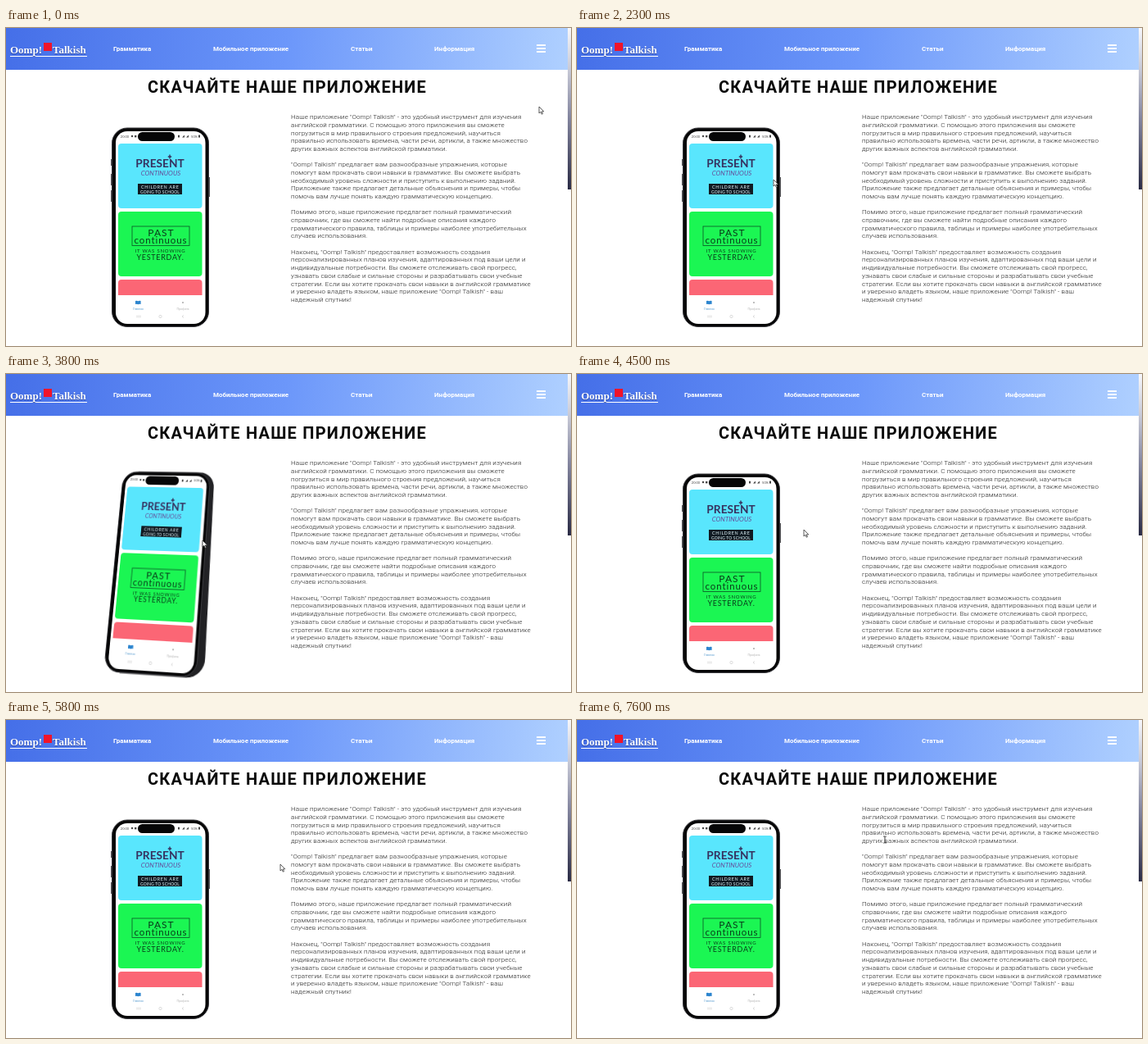
Animation of 690x388 px, one loop 7800 ms. Source, as an HTML page:

```html
<!DOCTYPE html>
<html lang="ru">
<head>
<meta charset="utf-8">
<title>Скачайте наше приложение</title>
<style>
html, body { margin: 0; width: 100%; height: 100%; overflow: hidden; background: #fff; }
#stage { position: relative; width: 690px; height: 388px; overflow: hidden; background: #fff; font-family: Roboto, sans-serif; }
#stage > * { position: absolute; }
header { left: 0; top: 0; width: 686px; height: 51px; background: linear-gradient(95deg, #456fe8, #6c97fa 50%, #afd0ff); }
header > * { position: absolute; }
nav a { position: absolute; top: 20px; font: 700 8px/11px Roboto, sans-serif; color: #fff; white-space: nowrap; }
.logo { left: 5px; top: 18px; width: 94px; height: 16px; border-bottom: 1px solid #fff; font: bold 13px/17px "Liberation Serif", serif; color: #fff; text-shadow: 0 1px 1px #2b4599; }
.logo > * { position: absolute; top: 0; }
.logo i { left: 41px; width: 10px; height: 10px; background: #f0142a; }
.logo b { left: 52px; }
.menu { left: 648px; top: 20px; width: 11px; height: 2px; background: #fff; box-shadow: 0 4px #fff, 0 8px #fff; }
.bar { left: 686px; top: 0; width: 4px; height: 197px; background: linear-gradient(#f6f7fb, #c9cbd8 25%, #8587a0 55%, #2a2b45); }
h1 { left: 0; top: 60px; width: 687px; margin: 0; text-align: center; font: 700 20px/25px Roboto, sans-serif; letter-spacing: 1.22px; color: #0a0a0a; white-space: nowrap; }
.text { left: 348px; top: 104.4px; margin: 0; font: 300 8px/9.67px Roboto, sans-serif; letter-spacing: .125px; color: #1c1c1c; white-space: pre; }
svg { left: 0; top: 0; overflow: visible; }
#phone { transform-origin: 188.5px 243px; }
#phone text { font-family: Lato, sans-serif; text-anchor: middle; }
#side { display: none; }
#phone.tilted { transform: translate(-2.5px, -4px) perspective(900px) rotateX(14deg) rotateY(-10deg) rotate(4.8deg) scale(.945, 1.045); }
.tilted #side { display: inline; }
.tilted #keys { display: none; }
</style>
</head>
<body>
<div id="stage">
  <header>
    <div class="logo"><span>Oomp!</span><i></i><b>Talkish</b></div>
    <nav>
      <a style="left:131px">Грамматика</a>
      <a style="left:253px">Мобильное приложение</a>
      <a style="left:421px">Статьи</a>
      <a style="left:523px">Информация</a>
    </nav>
    <div class="menu"></div>
  </header>
  <div class="bar"></div>
  <h1>СКАЧАЙТЕ НАШЕ ПРИЛОЖЕНИЕ</h1>
  <p class="text">Наше приложение "Oomp! Talkish" - это удобный инструмент для изучения
английской грамматики. С помощью этого приложения вы сможете
погрузиться в мир правильного строения предложений, научиться
правильно использовать времена, части речи, артикли, а также множество
других важных аспектов английской грамматики.

"Oomp! Talkish" предлагает вам разнообразные упражнения, которые
помогут вам прокачать свои навыки в грамматике. Вы сможете выбрать
необходимый уровень сложности и приступить к выполнению заданий.
Приложение также предлагает детальные объяснения и примеры, чтобы
помочь вам лучше понять каждую грамматическую концепцию.

Помимо этого, наше приложение предлагает полный грамматический
справочник, где вы сможете найти подробные описания каждого
грамматического правила, таблицы и примеры наиболее употребительных
случаев использования.

Наконец, "Oomp! Talkish" предоставляет возможность создания
персонализированных планов изучения, адаптированных под ваши цели и
индивидуальные потребности. Вы сможете отслеживать свой прогресс,
узнавать свои слабые и сильные стороны и разрабатывать свои учебные
стратегии. Если вы хотите прокачать свои навыки в английской грамматике
и уверенно владеть языком, наше приложение "Oomp! Talkish" - ваш
надежный спутник!</p>

  <svg id="phone" width="690" height="388">
    <path id="side" d="M150 121.500H234a19 19 0 0 1 19 19L257 342a22 22 0 0 1-22 23.500H150z" fill="#222225"/>
    <path id="keys" d="M129 160v8M129 178v14M129 198v14M248 182v24" stroke="#26262a" stroke-width="1.6"/>
    <rect x="129.5" y="122" width="118" height="242.5" rx="18.5" fill="#060607" stroke="#3a3a3e"/>
    <rect x="134" y="126" width="109.5" height="235" rx="14" fill="#fff"/>
    <rect x="161" y="127" width="45" height="11" rx="5.5" fill="#060607"/>
    <g fill="#444">
      <text x="145" y="133.5" font-size="4">20:00</text>
      <circle cx="154" cy="132" r="1.2"/><rect x="157" y="131" width="2.4" height="2.4"/>
      <path d="M210 130.8h2v2.6h-2zM215 133.4l3-3v3zM220 133.4l3-3v3z"/>
      <text x="230" y="133.5" font-size="4">50%</text>
      <rect x="235" y="130.6" width="2" height="3"/>
    </g>

    <rect x="137" y="141" width="102.5" height="79" rx="4" fill="#59e6fd"/>
    <g fill="#36315f">
      <text x="188" y="170" font-size="13.7" font-weight="700">PRESENT</text>
      <path d="M200 154.5v5M197.8 157h4.4" stroke="#36315f" stroke-width="1.4"/>
    </g>
    <text x="189" y="180" font-size="7.8" font-style="italic" fill="#664c98">CONTINUOUS</text>
    <rect x="161" y="190" width="54" height="13" fill="#101a22"/>
    <g fill="#e4f6fa">
      <text x="188.3" y="196.2" font-size="5.4" letter-spacing=".7">CHILDREN ARE</text>
      <text x="188" y="201.8" font-size="4.9" letter-spacing=".2">GOING TO SCHOOL</text>
    </g>

    <rect x="137" y="224" width="102.5" height="79" rx="4" fill="#1bf653"/>
    <rect x="154" y="242" width="70" height="23.5" fill="none" stroke="#0c5226" stroke-width=".8"/>
    <g fill="#093c1b">
      <text x="189.5" y="253.6" font-size="12" letter-spacing="1">PAST</text>
      <text x="189" y="263" font-size="11.5" letter-spacing=".9">continuous</text>
      <text x="188.5" y="274" font-size="6" letter-spacing=".8">IT WAS SNOWING</text>
      <text x="188.5" y="282.5" font-size="9" letter-spacing=".7">YESTERDAY.</text>
    </g>

    <path d="M137 326v-15a4 4 0 0 1 4-4h94.5a4 4 0 0 1 4 4v15z" fill="#fb6675"/>
    <path d="M158 333q1.7-.8 3.3.3q1.7-1.1 3.3-.3v4q-1.6-.8-3.3.3q-1.6-1.1-3.3-.3z" fill="#2c85cf"/>
    <text x="161.5" y="344" font-size="3.6" fill="#5b9dd0">Главная</text>
    <circle cx="216" cy="335" r="1" fill="#aaa"/>
    <text x="216" y="344" font-size="3.6" fill="#b5b5b5">Профиль</text>
    <g fill="none" stroke="#ccc" stroke-width=".7">
      <path d="M160 350.5v3M162 350.5v3M164 350.5v3M217 350.5l-2 1.5l2 1.5"/>
      <rect x="187" y="350.5" width="3" height="3" rx="1"/>
    </g>
  </svg>

  <svg id="mouse" width="12" height="14">
    <path id="arrow" d="M0 0V8L1.9 6.3L3.2 9.2L4.5 8.6L3.2 5.9H5.8Z" fill="#fff" stroke="#333" stroke-width=".8"/>
    <path id="beam" d="M-1.8-4H-.4L0-3.6L.4-4H1.8M0-3.6V3.6M-1.8 4H-.4L0 3.6L.4 4H1.8" fill="none" stroke="#222" stroke-width=".9"/>
  </svg>
</div>
<script>
const LOOP = 7800, STEP = 100;
const el = id => document.getElementById(id);

// time, x, y of the pointer tip
const path = [
  [0, 651, 96], [700, 651, 96], [1100, 575, 102], [1500, 487, 117],
  [1900, 370, 155], [2300, 240, 185], [2500, 180, 202], [2800, 155, 210],
  [3200, 160, 215], [3600, 185, 212], [3800, 240, 203], [3900, 303, 196],
  [4100, 333, 190], [4300, 318, 188], [4500, 277, 190], [4600, 242, 203],
  [4800, 185, 235], [5100, 156, 259], [5200, 155, 260], [5300, 178, 255],
  [5500, 284, 215], [5900, 352, 163], [6300, 376, 146], [LOOP, 376, 146]
];
// spans in which the phone shows its hover pose
const hovers = [[2400, 4000], [4700, 5500]];

function pointer(t) {
  const i = path.findIndex(p => p[0] > t);
  const a = path[i - 1], b = path[i], k = (t - a[0]) / (b[0] - a[0]);
  return [a[1] + (b[1] - a[1]) * k, a[2] + (b[2] - a[2]) * k];
}

function draw(now) {
  const t = Math.floor(now % LOOP / STEP) * STEP;
  const [x, y] = pointer(t);
  const onText = x > 348 && x < 640 && y > 103;
  el("mouse").style.transform = `translate(${x}px, ${y}px)`;
  el("arrow").style.display = onText ? "none" : "";
  el("beam").style.display = onText ? "" : "none";
  el("phone").classList.toggle("tilted", hovers.some(([on, off]) => t >= on && t < off));
  requestAnimationFrame(draw);
}
draw(0);
</script>
</body>
</html>
```
